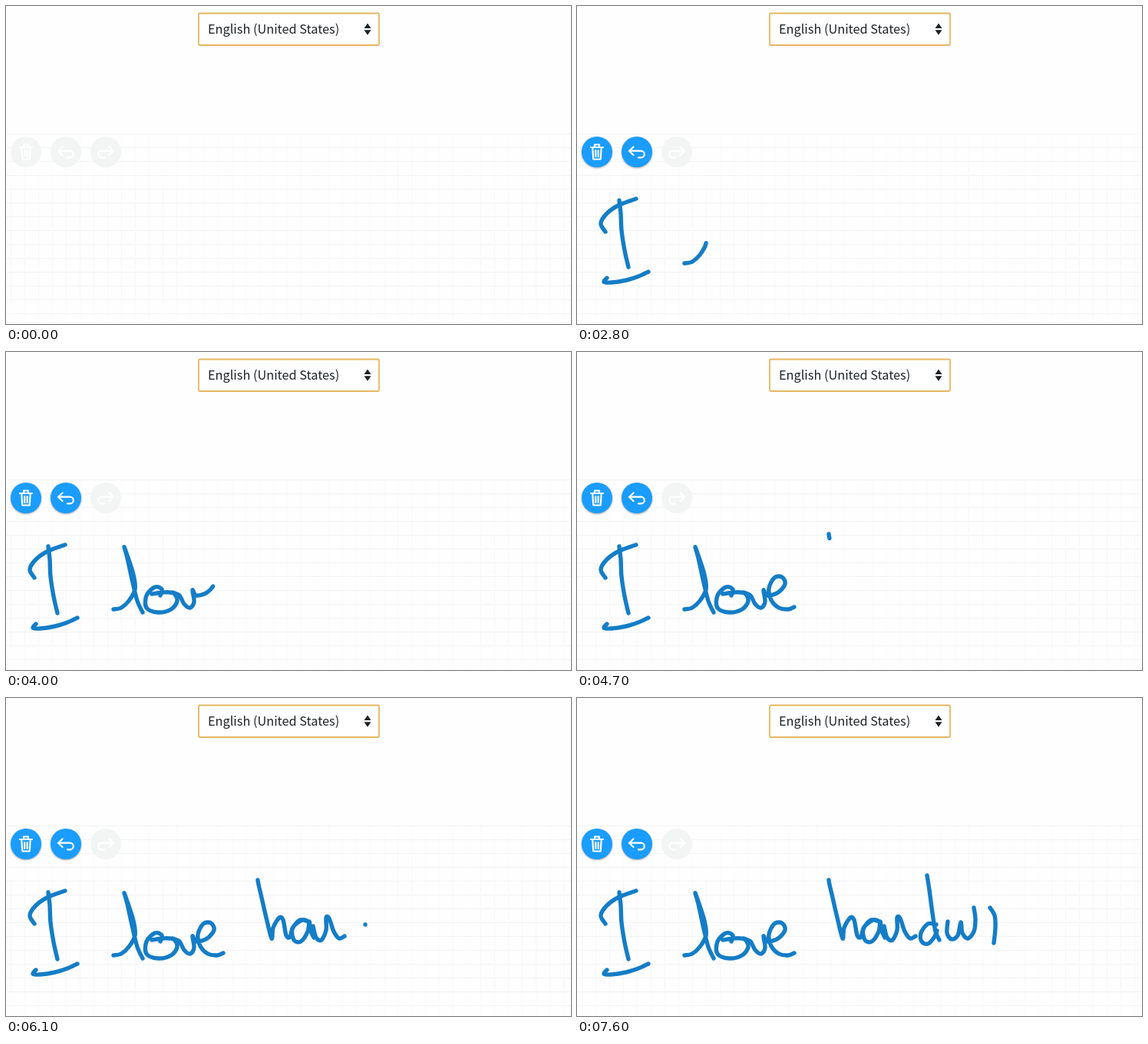
Animation, 736 px wide and 414 px high, one loop 8000 ms. Source, as an HTML page:

```html
<!DOCTYPE html>
<html lang="en">
<head>
<meta charset="utf-8">
<title>Handwriting pad</title>
<style>
  html, body { margin: 0; width: 100%; height: 100%; overflow: hidden; background: #fefefe; }
  svg { display: block; width: 736px; height: 414px; }
  text { font: 16.3px "Noto Sans CJK JP", "Noto Sans CJK SC", "Noto Sans", sans-serif; fill: #1d2226; }
  .icon { fill: none; stroke: #fff; stroke-width: 2.2; stroke-linecap: round; stroke-linejoin: round; }
  .disc { fill: #f3f5f5; }
  .on .disc { fill: #1a9dff; filter: drop-shadow(0 1.5px 1.2px rgba(0, 0, 0, .35)); }
  #ink path { fill: none; stroke: #147dc7; stroke-width: 5.4; stroke-linecap: round; stroke-linejoin: round; }
</style>
</head>
<body>
<svg viewBox="0 0 736 414">
  <rect width="736" height="414" fill="#fefefe"/>
  <g id="grid"></g>
  <rect x="251" y="9.5" width="235" height="41.5" rx="1.5" fill="#fff" stroke="#e6b661" stroke-width="1.8"/>
  <text x="263" y="36">English (United States)</text>
  <path d="M466.5 29H475.5L471 22.5ZM466.5 31.3H475.5L471 37.8Z" fill="#1d2226"/>
  <g id="trash">
    <circle class="disc" cx="26" cy="190" r="20"/>
    <path class="icon" d="M18 184H34M23 183V180.5H29V183M20.3 185L21.3 199.5H30.7L31.7 185M24.3 188V196M27.7 188V196"/>
  </g>
  <g id="undo">
    <circle class="disc" cx="78" cy="190" r="20"/>
    <path class="icon" d="M73.5 183.5L68 188.7L73.5 194M68.5 188.7H83.5A4.3 4.3 0 0 1 83.5 197.3H80"/>
  </g>
  <g id="redo">
    <circle class="disc" cx="130" cy="190" r="20"/>
    <path class="icon" d="M134.5 183.5L140 188.7L134.5 194M139.5 188.7H124.5A4.3 4.3 0 0 0 124.5 197.3H128"/>
  </g>
  <g id="ink"></g>
</svg>
<script>
const LOOP = 8000, STEP = 100;
const $ = id => document.getElementById(id);

function add(parent, tag, attrs) {
  const el = document.createElementNS("http://www.w3.org/2000/svg", tag);
  for (const k in attrs) el.setAttribute(k, attrs[k]);
  return parent.appendChild(el);
}

// Ruled paper: clear rows, faint columns that show more near the sides
function drawGrid() {
  let rows = "", cols = "", marks = "";
  for (let y = 166.5; y < 414; y += 18) rows += `M0 ${y}H736`;
  for (let x = 6.5; x < 736; x += 18) {
    cols += `M${x} 166V414`;
    if (x < 230 || x > 610) marks += `M${x} 240V382`;
    else if (x > 505 && x < 530) marks += `M${x} 203V256`;
  }
  const line = (d, stroke, dash) => add($("grid"), "path", { d, stroke, "stroke-dasharray": dash });
  line(cols, "#fbfbfb", "none");
  line(marks, "#f6f6f6", "13 5");
  line(rows, "#f3f3f3", "none");
}

// Smooth curve through the points
function curve(pts) {
  const at = i => pts[Math.max(0, Math.min(pts.length - 1, i))];
  let d = `M${pts[0]}`;
  for (let i = 0; i < pts.length - 1; i++) {
    const [a, b, c, e] = [at(i - 1), at(i), at(i + 1), at(i + 2)];
    const c1 = [0, 1].map(k => b[k] + (c[k] - a[k]) / 6);
    const c2 = [0, 1].map(k => c[k] - (e[k] - b[k]) / 6);
    d += `C${c1} ${c2} ${c}`;
  }
  return d;
}

const strokes = [];
// progress: drawn share at each step from start
function stroke(start, progress, points) {
  const pts = points.split(" ").map(p => p.split(",").map(Number));
  const el = add($("ink"), "path", { d: curve(pts) });
  strokes.push({ el, start, progress, len: el.getTotalLength() });
}
const even = (n, from = 0) => Array.from({ length: n }, (_, i) => from + (1 - from) * i / (n - 1));

drawGrid();
// I
stroke(1200, [0, 0, 0, .55, 1], "55,253 57,270 58,292 62,318 67,340");
stroke(1700, [.04, .04, 1], "39,354 35,359 44,360 64,357 80,352 93,346");
stroke(2100, [.2, .6, 1], "37,294 31,283 39,270 55,259 77,251");
// l
stroke(2700, [0, .22, .48, .75, 1], "140,335 150,333 160,324 168,309 166,290 157,262 154,254 158,268 165,300 171,324 178,339");
// o
stroke(3300, [0, .4, 1], "201,317 203,309 194,306 183,317 183,333 198,339 215,335 223,324 218,314 204,313 190,315");
// ve
stroke(3700, even(7), "217,313 226,317 232,328 240,333 245,325 243,310 248,317 262,313 271,302 267,293 257,294 250,308 253,323 263,333 275,335 283,332");
// ha
stroke(4700, even(9, .02), "328,237 329,243 333,260 339,286 346,313 348,299 356,286 361,289 365,309 370,311 374,298 386,289 393,291 383,289 373,301 375,315 384,317 393,304 395,291 397,303 401,312");
// n
stroke(5600, even(5), "400,297 404,312 411,315 417,302 417,286 421,287 427,304 434,313 441,310");
// d
stroke(6100, even(4), "468,295 457,294 448,306 449,317 457,320 465,312 469,303");
stroke(6500, even(4), "456,231 459,250 463,280 467,304 472,315");
// w
stroke(6900, even(5), "483,291 482,306 488,314 496,309 500,292 502,306 509,313 517,304 519,288 517,273");
// r
stroke(7500, [.4, 1], "538,273 544,283 545,299 543,319");

function draw(ms) {
  const t = Math.floor(ms % LOOP / STEP) * STEP;
  for (const id of ["trash", "undo"]) $(id).classList.toggle("on", t >= 1600);
  for (const { el, start, progress, len } of strokes) {
    const i = Math.min((t - start) / STEP, progress.length - 1);
    el.style.display = i < 0 ? "none" : "";
    if (i >= 0) el.style.strokeDasharray = progress[i] < 1 ? `${progress[i] * len} ${len * 2}` : "none";
  }
}

let origin;
function tick(now) {
  origin ??= now;
  draw(now - origin);
  requestAnimationFrame(tick);
}
draw(0);
requestAnimationFrame(tick);
</script>
</body>
</html>
```
